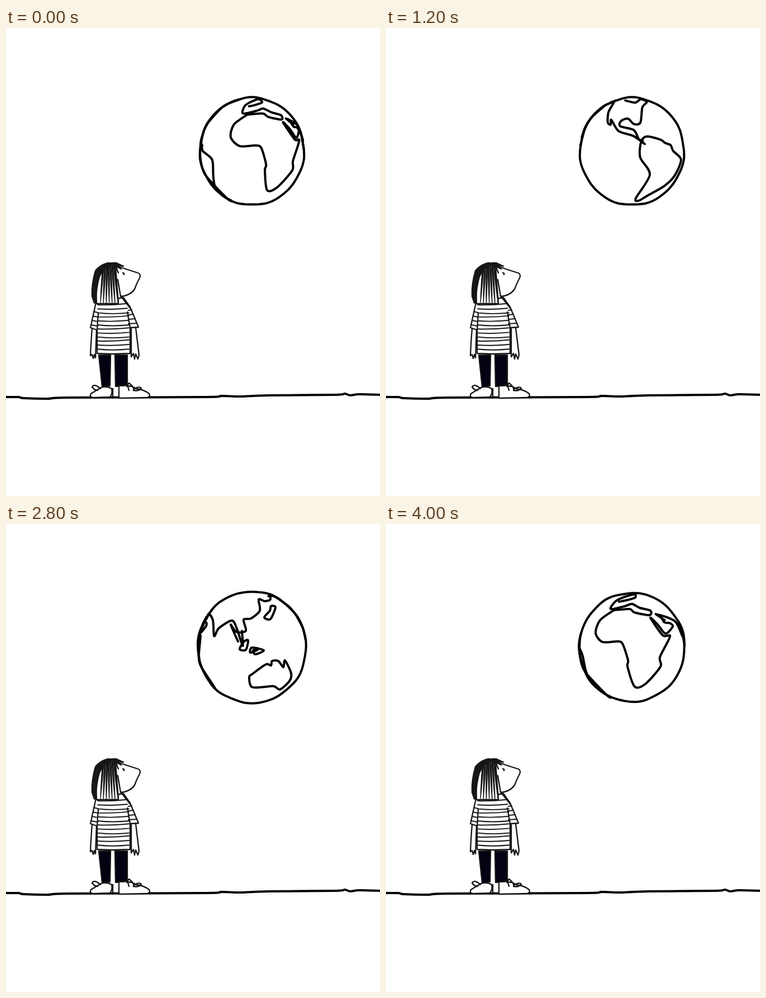
An HTML page that plays this animation: 669 by 837 pixels, repeating every 4200 ms.

```html
<!DOCTYPE html>
<html lang="en">
<head>
<meta charset="utf-8">
<title>Girl watching the globe</title>
<style>
html, body { margin: 0; width: 100%; height: 100%; overflow: hidden; background: #fff }
svg { display: block; width: 669px; height: 837px }
path { fill: none; stroke: #000; stroke-linecap: round; stroke-linejoin: round }
#ground, #globe path { stroke-width: 4 }
#girl path { stroke: #161616; stroke-width: 2.3 }
#girl .white { fill: #fff }
#girl .dark { fill: #171717 }
#girl .leg { fill: #020212 }
#girl .stripe { stroke-width: 1.9 }
#girl .strand { fill: #171717; stroke-width: 1.3 }
</style>
</head>
<body>
<svg viewBox="0 0 669 837">
  <path id="ground"/>
  <g id="girl">
    <!-- arms -->
    <path d="M154 538Q152 560 151 586L154 584 156 591 158 584 160 590 162 538"/>
    <path d="M224 538V588L228 582 230 592 232 583 236 592 238 585 232 536"/>
    <!-- legs and shoes -->
    <path class="leg" d="M166 585H187L186 640 172 642Z"/>
    <path class="leg" d="M195 585H217V639L196 641Z"/>
    <path class="white" d="M170 643Q160 649 152 654Q148 661 158 661L186 660Q191 653 189 645Q181 640 170 643Z"/>
    <path d="M169 645Q158 635 154 642Q158 648 164 648"/>
    <path class="white" d="M202 641V662L252 661Q259 659 256 654Q246 646 232 645Q225 639 216 641"/>
    <path d="M220 648Q216 637 220 635Q228 641 229 647M228 646Q238 640 242 644Q238 650 228 648M191 645V662"/>
    <!-- shirt -->
    <path class="white" d="M161 491L151 536 163 540V582L190 583 222 582V536L237 535 222 499 210 482Z"/>
    <path d="M165 510L163 540M217 508L222 536"/>
    <g id="stripes"></g>
    <!-- face and hair -->
    <path class="white" d="M196 425Q217 432 236 438Q242 440 239 447Q234 456 230 467Q222 479 205 480L200 450"/>
    <path class="white" d="M169 428Q181 417 196 426L201 493H162Q159 460 169 428Z"/>
    <path class="dark" d="M184 420Q169 423 160 434Q153 457 154 480L158 492 161 490Q161 465 167 445L174 431 188 424Z"/>
    <path class="dark" d="M180 421L197 420 210 426 198 424 206 431 196 426Z"/>
    <path d="M196 425L201 438M205 479L222 501"/>
    <g id="hair"></g>
    <path id="eye"/>
  </g>
  <g id="globe"><path id="rim"/><path id="land"/></g>
</svg>
<script>
const $ = id => document.getElementById(id);
const parse = s => s.split(' ').map(p => p.split(',').map(Number));
const STEPS = 21, TURN = 20.6 * Math.PI / 180, CX = 440, CY = 220.5, EDGE = Math.PI / 2;

// Smooth path through points; joins up when the last equals the first.
function curve(pts) {
  const n = pts.length - 1;
  const loop = pts[0][0] === pts[n][0] && pts[0][1] === pts[n][1];
  const at = i => i < 0 ? pts[loop ? n - 1 : 0] : i > n ? pts[loop ? 1 : n] : pts[i];
  const r = v => v.toFixed(1);
  let d = 'M' + pts[0].map(r);
  for (let i = 0; i < n; i++) {
    const [a, b, c, e] = [at(i - 1), at(i), at(i + 1), at(i + 2)];
    d += 'C' + [b[0] + (c[0] - a[0]) / 7, b[1] + (c[1] - a[1]) / 7,
                c[0] - (e[0] - b[0]) / 7, c[1] - (e[1] - b[1]) / 7, ...c].map(r);
  }
  return d;
}

// The globe swells and shrinks every six steps; the count restarts at 15.
const phase = step => step < 15 ? step % 6 : step - 15;
const halfWidth = step => 95.5 - 2.5 * Math.cos(phase(step) * Math.PI / 3);

function rim(step) {
  const w = halfWidth(step), p = phase(step), pts = [];
  for (let i = 0; i < 48; i++) {
    const a = i * Math.PI / 24;
    const wobble = 0.6 * Math.sin(7 * a + 2 * p) + 0.4 * Math.sin(11 * a + p);
    pts.push([CX + (w + wobble) * Math.cos(a), CY + (w + 3 + wobble) * Math.sin(a)]);
  }
  return curve([...pts, pts[0]]);
}

// Coasts: the step at which they lie as given, then a few points.
const coasts = [
  // Africa and Arabia
  [20, '408,154 383,172 375,195 387,211 413,210 423,214 433,244 432,255 445,291 464,286 491,255 490,238 508,201 495,199 473,168 486,180 500,196 513,183 507,177 498,176 492,166'],
  // Europe
  [20, '408,154 436,152 444,158 471,163 473,155 454,150 440,143 427,147 402,152 411,138 428,130 445,126 445,132 427,137 417,139'],
  // South America
  [4, '391,203 402,193 429,199 438,205 452,209 459,220 490,236 478,265 457,285 431,303 426,312 415,308 412,264 389,232 391,203'],
  // North America, east and west
  [4, '412,126 418,130 440,124 443,129 420,139 399,167 388,170 384,160 374,164 369,174 384,181 388,198 394,201'],
  [8, '403,129 429,130 440,148 451,167 459,171 456,162 478,183 503,192 519,207'],
  // Asia, south and east
  [16, '385,161 391,172 387,162 420,174 433,201 441,187 463,174 476,188 489,218 485,192'],
  [14, '415,210 402,180 412,193 429,191 425,171 438,169 454,155 452,135 463,138 473,135 478,126'],
  // Japan and the islands
  [14, '474,147 482,149 473,170 462,167 472,155 474,147'],
  [14, '425,211 433,208 429,225 418,224 425,211'],
  [14, '437,230 440,221 461,226 446,233 442,226 450,225 437,230'],
  // Australia
  [14, '441,268 465,251 474,253 476,245 487,245 496,256 499,244 510,267 507,281 490,296 478,290 441,292 435,274 441,268']
].map(([at, s]) => {
  const w = halfWidth(at);
  const spots = parse(s).map(([x, y]) => {
    const v = (y - CY) / (w + 3), u = (x - CX) / w / Math.sqrt(1 - v * v);
    return [Math.asin(Math.max(-1, Math.min(1, u))), v];
  });
  return { at, spots };
});

// Points beyond the edge slide along the rim.
function coastPath({ at, spots }, step) {
  const w = halfWidth(step);
  const turn = ((step - at + STEPS + 10) % STEPS - 10) * TURN;
  const turned = spots.map(([lon, v]) => [lon + turn, v]);
  if (turned.every(([lon]) => Math.abs(lon) > EDGE)) return '';
  return curve(turned.map(([lon, v]) => {
    const a = Math.max(-EDGE, Math.min(EDGE, lon));
    return [CX + w * Math.sqrt(1 - v * v) * Math.sin(a), CY + (w + 3) * v];
  }));
}

const line = (d, cls) => `<path class="${cls}" d="${d}"/>`;
$('ground').setAttribute('d', curve(parse('-4,660 22,660 32,662 75,663 110,661 358,660 385,658 420,659 470,657 590,656 606,654 616,657 632,655 673,656')));

let rows = '';
for (let i = 0; i < 12; i++) {
  const y = 495 + i * 7.2, bend = i % 3 - 1;
  rows += line(`M164 ${y}Q190 ${y + 2 + bend} ${Math.min(220, 214 + i * 3)} ${y - 1 + bend}`, 'stripe');
}
for (let i = 0; i < 4; i++) {
  const y = 507 + i * 8;
  rows += line(`M${157 - i * 1.5} ${y}L164 ${y + 2}M219 ${y - 2}L${225 + i * 3} ${y - 3}`, 'stripe');
}
$('stripes').innerHTML = rows;

let strands = '';
for (let i = 0; i < 7; i++) {
  const x = 174 + i * 3.2, end = `${169 + i * 5.2} ${491 + i % 3}`;
  strands += line(`M${x - 1} 425Q${x - 4 + i} 455 ${end}Q${x - 1 + i} 455 ${x + 1} 425Z`, 'strand');
}
$('hair').innerHTML = strands;

const blinks = [5, 8, 15];
const start = performance.now();
let shown = -1;
function draw(now) {
  const step = Math.floor(Math.max(0, now - start) / 200) % STEPS;
  if (step !== shown) {
    shown = step;
    $('rim').setAttribute('d', rim(step));
    $('land').setAttribute('d', coasts.map(c => coastPath(c, step)).join(''));
    $('eye').setAttribute('d', blinks.includes(step) ? 'M209 443Q213 443 213 439' : 'M209 438Q212 438 211 441');
  }
  requestAnimationFrame(draw);
}
draw(start);
</script>
</body>
</html>
```
